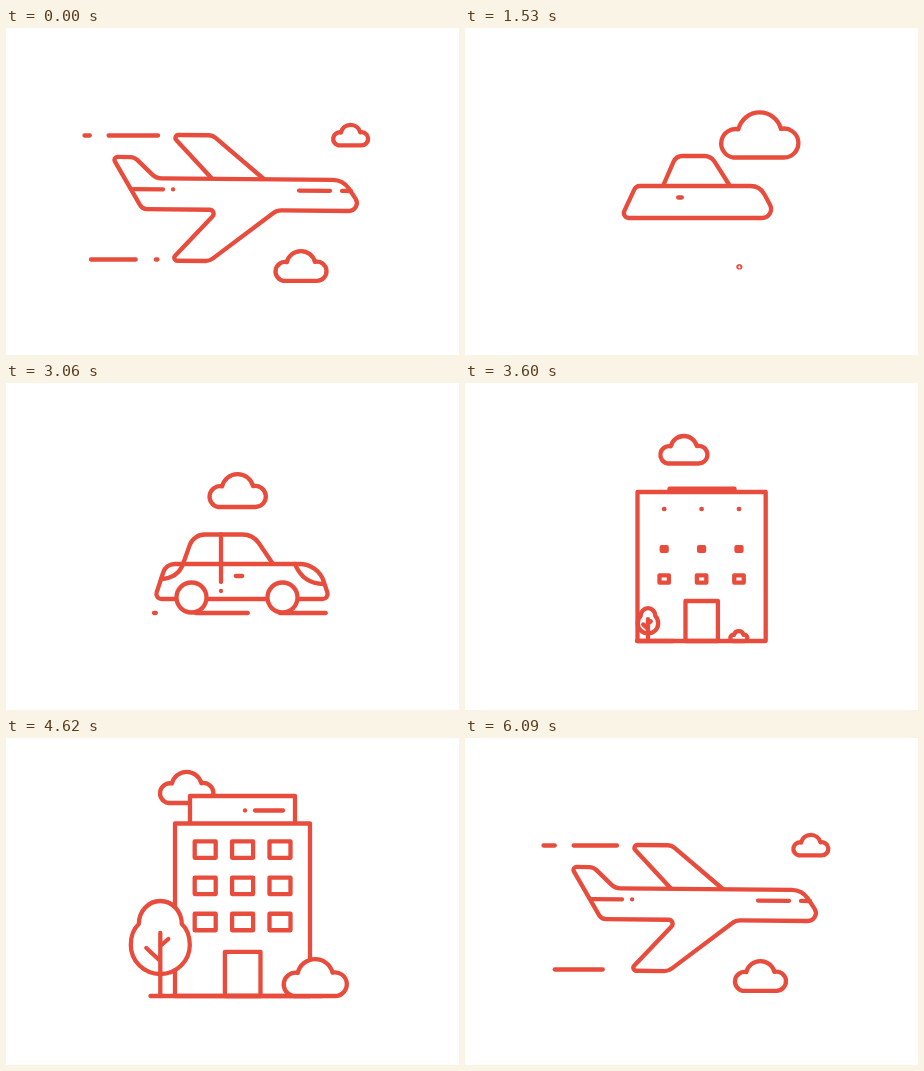
An HTML page that plays this animation: 453x327 px, repeating every 6.12 s.

```html
<!DOCTYPE html>
<html lang="en">
<head>
<meta charset="utf-8">
<title>Plane, car, building</title>
<style>
  html, body { margin: 0; width: 100%; height: 100%; overflow: hidden; background: #fff; }
  svg { display: block; width: 100vw; height: 100vh; }
  svg * { vector-effect: non-scaling-stroke; }
</style>
</head>
<body>
<svg id="stage" viewBox="0 0 453 327" fill="none" stroke="#e74c3c" stroke-width="4.3"
     stroke-linecap="round" stroke-linejoin="round"></svg>
<script>
const LOOP = 6120;
const stage = document.getElementById('stage');

function add(tag, attrs = {}, parent = stage) {
  const el = document.createElementNS('http://www.w3.org/2000/svg', tag);
  for (const key in attrs) el.setAttribute(key, attrs[key]);
  return parent.appendChild(el);
}
const path = (d = '', parent = stage, fill = 'none') => add('path', { d, fill }, parent);
const solid = (d = '', parent = stage) => path(d, parent, '#fff');
const show = (el, on) => el.setAttribute('display', on ? 'inline' : 'none');
const setD = (el, d) => el.setAttribute('d', d);

const clamp = k => Math.max(0, Math.min(1, k));
const smooth = k => k * k * (3 - 2 * k);
const ramp = (t, from, to) => smooth(clamp((t - from) / (to - from)));
const pulse = (t, in0, in1, out0, out1) => ramp(t, in0, in1) - ramp(t, out0, out1);
const late = k => clamp(2 * k - 1);
const mix = (a, b, k) => Array.isArray(a) ? a.map((v, i) => v + (b[i] - v) * k) : a + (b - a) * k;

// One timeline for everything: plane > squat > car > low building > tall building > plane
function pose(t, plane, squat, car, low, tall) {
  let value = mix(plane, squat, ramp(t, 1290, 1530));
  value = mix(value, car, ramp(t, 1530, 1760));
  value = mix(value, low, ramp(t, 3240, 3600));
  value = mix(value, tall, ramp(t, 3600, 3880));
  return mix(value, plane, ramp(t, 4990, 5300));
}

// Polygon with rounded corners from flat [x, y, radius, ...]
function rounded(flat, closed) {
  const pts = [];
  for (let i = 0; i < flat.length; i += 3) pts.push(flat.slice(i, i + 3));
  const n = pts.length;
  const toward = (p, q) => {
    const len = Math.hypot(q[0] - p[0], q[1] - p[1]) || 1e-6;
    return [(q[0] - p[0]) / len, (q[1] - p[1]) / len, len];
  };
  const d = pts.map((p, i) => {
    const [x, y, r] = p;
    const a = toward(p, pts[(i + n - 1) % n]), b = toward(p, pts[(i + 1) % n]);
    const angle = Math.acos(Math.max(-1, Math.min(1, a[0] * b[0] + a[1] * b[1])));
    const end = !closed && (i === 0 || i === n - 1);
    if (end || r < 0.1 || angle > 3.1) return `L${x} ${y}`;
    const tan = Math.tan(angle / 2);
    const cut = Math.min(r / tan, a[2] / 2, b[2] / 2);
    const sweep = a[0] * b[1] - a[1] * b[0] < 0 ? 1 : 0;
    return `L${x + a[0] * cut} ${y + a[1] * cut}` +
      `A${cut * tan} ${cut * tan} 0 0 ${sweep} ${x + b[0] * cut} ${y + b[1] * cut}`;
  }).join('');
  return 'M' + d.slice(1) + (closed ? 'Z' : '');
}

// Four-cornered body with the same number of points as the plane
function hull(tl, tr, br, bl) {
  const on = (p, q, k) => [...mix(p, q, k).slice(0, 2), 0];
  return [tl, on(tl, tr, .2), on(tl, tr, .35), tr, br,
    ...[.3, .45, .6, .65].map(k => on(br, bl, k)), bl].flat();
}
const block = (l, t, r, b) => hull([l, t, 0], [r, t, 0], [r, b, 0], [l, b, 0]);
const slab = (l, t, r, b) => [l, b, 0, l, t, 0, r, t, 0, r, b, 0];

const BODIES = [
  [[105.9, 130, 3], [128, 130, 10], [150, 151, 14], [337, 151, 20], [358, 182, 8],
    [271, 182, 14], [204, 233.3, 12], [165, 233.3, 3], [213, 182, 4], [136.5, 182, 8]].flat(),
  hull([171, 158, 6], [295, 158, 16], [312, 190, 9], [156, 190, 5]),
  hull([160, 181, 12], [312, 181, 28], [323.5, 216, 5], [148.5, 216, 5]),
  block(172.5, 109, 300.7, 258),
  block(169, 85.5, 304, 258)
];
const ROOFS = [
  [206, 151, 0, 165, 107.5, 3, 206, 107.5, 10, 258, 151, 0],
  [198, 158, 0, 211, 128, 10, 246, 128, 12, 265, 158, 0],
  [177, 181, 0, 187.5, 151.5, 16, 247, 151.5, 20, 267, 181, 0],
  slab(204.5, 105.7, 269.5, 109),
  slab(184, 58, 289, 85.5)
];

// Cloud of width 1 standing on its flat bottom
const CLOUD = 'M-.32 0A.18 .18 0 1 1 -.25 -.355A.2755 .2755 0 0 1 .285 -.36A.182 .182 0 1 1 .32 0Z';

// A stroke that can be drawn in and out
function trimmed(d, parent) {
  const el = path(d, parent);
  const total = el.getTotalLength();
  return p => {
    show(el, p > .01);
    el.setAttribute('stroke-dasharray', p > .99 ? 'none' : `${p * total} ${total * 2 + 9}`);
  };
}
function place(el, x, y, s) {
  show(el, s > .01);
  el.setAttribute('transform', `translate(${x} ${y}) scale(${s})`);
}
// Dashes [start, length] running left, seen between lo and hi
function dashes(el, segments, y, shift, lo, hi) {
  setD(el, segments.map(([a, len]) => [Math.max(lo, a - shift), Math.min(hi, a + len - shift)])
    .filter(([a, b]) => b > a).map(([a, b]) => `M${a} ${y}H${b}`).join(''));
}
const series = (from, to, rule) => Array.from({ length: to - from + 1 }, (_, i) => rule(from + i));

// Wind dashes get shorter and rarer towards the end of the flight
const TOP_WIND = series(0, 3, i => [24 + 75 * i + 3.8 * i * i, 60 - 10 * i]);
const LOW_WIND = series(-1, 4, i => [82 + 67 * i + 1.1 * i * i, 48 - 5.5 * i]);
const ROAD = series(-2, 2, i => [[164 + 170 * i, 52], [248 + 170 * i, 46]]).flat();

// Parts, back to front
const skyCloud = solid(CLOUD);
const topWind = path(), lowWind = path(), road = path();
const craft = add('g');
const roof = solid('', craft), body = solid('', craft);
const planeLines = ['M127 162H157', 'M167 162H167.1', 'M293 162H324', 'M336 162H345']
  .map(d => trimmed(d, craft));

const carLines = ['M155 196Q172 195 177 181', 'M318 201Q297 201 289 181',
  'M215 151.5V199', 'M215 208V208.1'].map(d => trimmed(d));
const handle = path();
const wheels = [185.5, 276.5].map(x => ({ x, el: solid('M-15 0A15 15 0 1 1 15 0A15 15 0 1 1 -15 0Z') }));

const sign = ['M239 72.5H239.1', 'M249 72.5H277'].map(d => trimmed(d));
const windows = path(), door = path(), ground = path();
const tree = add('g');
solid('M-21.5 -72A21.5 23 0 0 1 21.5 -72C28 -66 29.5 -58 29.5 -51A29.5 29 0 0 1 -29.5 -51C-29.5 -58 -28 -66 -21.5 -72Z', tree);
path('M0 0V-63M0 -35L-14 -48M0 -50L8 -57', tree);
const lowCloud = solid(CLOUD);

function drawClouds(t) {
  // The sky cloud leaves on the left and comes back on the right
  const drift = .04 * (t < 5150 ? t : t - LOOP);
  const present = 1 - pulse(t, 4950, 5140, 5180, 5550);
  place(skyCloud, pose(t, 344, 354.5, 353, 362, 364.5) - drift,
    pose(t, 117.3, 129.5, 124, 80.5, 65), pose(t, 36, 79.5, 58, 48.5, 55) * present);

  const flight = t < 3000 ? t : t - LOOP;
  place(lowCloud, pose(t, 294 - .0155 * flight, 274.3, 274, 273.5, 308),
    pose(t, 252.8, 239.3, 258, 258, 258), pose(t, 52.5, 2, 0, 17.5, 65));
}

function drawPlane(t) {
  const flight = t < 3000 ? t : t - LOOP;
  const flying = pose(t, 1, 0, 0, 0, 0);
  craft.setAttribute('transform', `rotate(${.52 * Math.cos(flight * Math.PI / 840) * flying} 230 166)`);
  setD(body, rounded(pose(t, ...BODIES), true));
  setD(roof, rounded(pose(t, ...ROOFS), false));
  planeLines.forEach(draw => draw(late(flying)));
  dashes(topWind, TOP_WIND, 107.5, flight * .2, 78.5, 152);
  dashes(lowWind, LOW_WIND, 231.5, flight * .267, 85, 151.5);
}

function drawCar(t) {
  const details = late(pose(t, 0, 0, 1, 0, 0));
  carLines.forEach(draw => draw(details));
  wheels.forEach(w => place(w.el, w.x, 214.5, details));
  const [x, y, half] = pose(t, [215, 162, 0], [215, 169.5, 1.8], [233, 193, 3.2], [233, 193, 0], [233, 193, 0]);
  setD(handle, half > .05 ? `M${x - half} ${y}H${x + half}` : '');
  const lo = 321 - 173 * ramp(t, 1720, 1900), hi = 321 - 173 * ramp(t, 3180, 3340);
  dashes(road, ROAD, 230, (t - 2340) * .2, lo, hi);
}

function drawBuilding(t) {
  const grown = pulse(t, 3450, 3600, 4960, 5130);
  const signOn = late(pose(t, 0, 0, 0, 0, 1));
  sign.forEach(draw => draw(signOn));

  // Window rows open from the bottom up
  let panes = '';
  for (let row = 0; row < 3; row++) {
    const size = grown * pose(t, 0, 0, 0, .45 - .215 * row, 1);
    if (size < .01) continue;
    const low = 196 - 25 * row - 5 * row * row, high = 184 - 36.2 * row;
    const y = pose(t, high, low, low, low, high), w = 21 * size, h = 16.5 * size;
    for (let col = -1; col < 2; col++)
      panes += `M${236.6 + 37.4 * col - w / 2} ${y - h / 2}h${w}v${h}h${-w}Z`;
  }
  setD(windows, panes);

  const half = pose(t, 12, 12, 12, 16.2, 17.8), height = grown * pose(t, 0, 0, 0, 40, 44.2);
  setD(door, height > .5 ? `M${236.7 - half} 258v${-height}h${2 * half}v${height}Z` : '');

  place(tree, pose(t, 154.3, 183, 183, 183, 154.3), 258, grown * pose(t, 0, 0, 0, .345, 1));
  const reach = grown * pose(t, 0, 0, 0, .1, 1);
  setD(ground, reach > .01 ? `M${175 - 30.5 * reach} 258H${196 + 120 * reach}` : '');
}

const start = performance.now();
function tick() {
  const t = (performance.now() - start) % LOOP;
  for (const draw of [drawClouds, drawPlane, drawCar, drawBuilding]) draw(t);
  requestAnimationFrame(tick);
}
tick();
</script>
</body>
</html>
```
